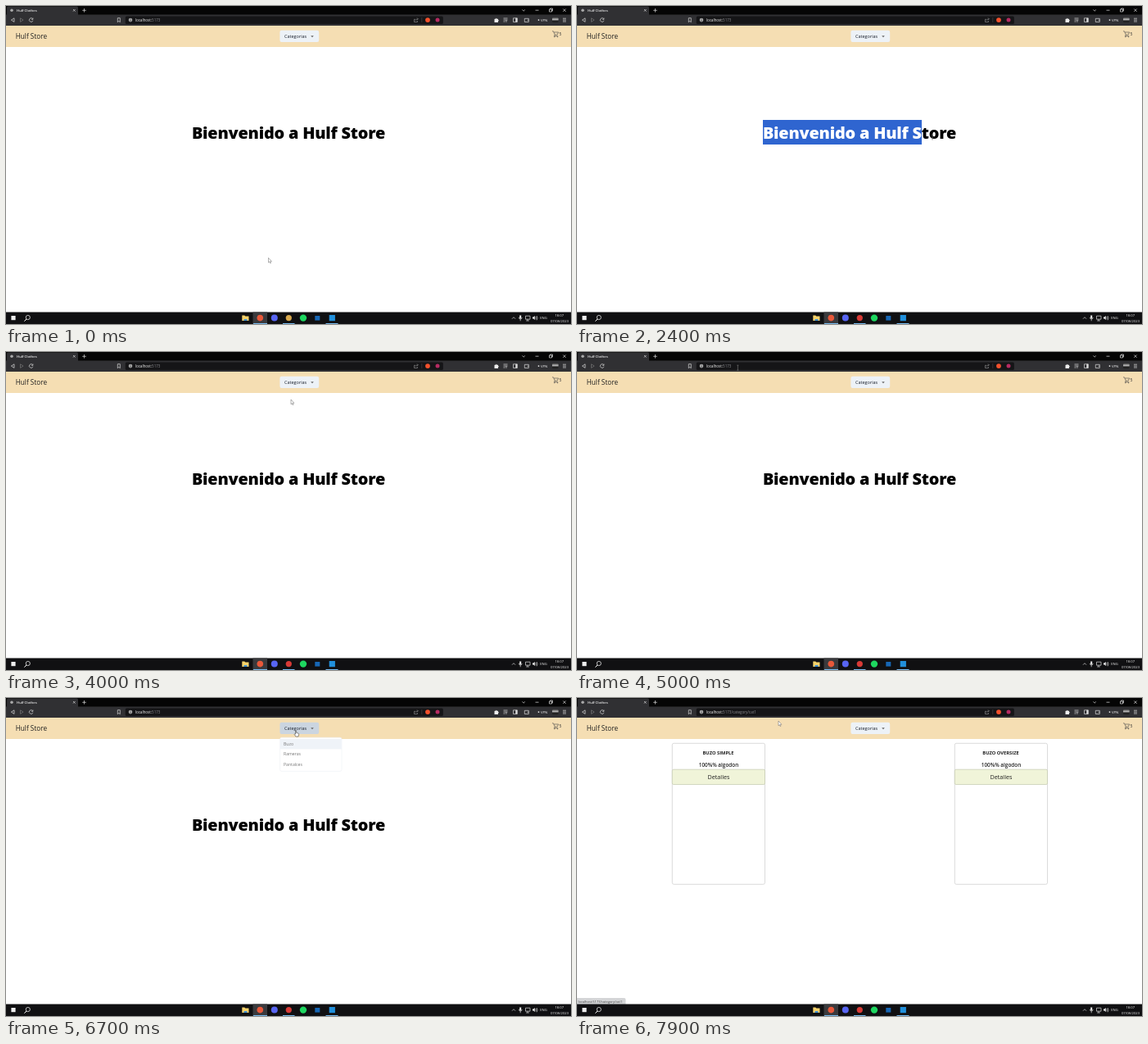
An HTML page for the animation above (8000 ms loop, 690 by 388 pixels).

```html
<!DOCTYPE html>
<html lang="es">
<head>
<meta charset="utf-8">
<title>Hulf Clothes</title>
<style>
  html, body { margin: 0; width: 100%; height: 100%; overflow: hidden; background: #fff; }
  svg { display: block; width: 690px; height: 388px; }
  text { font-family: "Open Sans", "Noto Sans", sans-serif; white-space: pre; }
  .line { fill: none; stroke: #ddd; stroke-width: .7; }
  .mid { text-anchor: middle; }
  .title { font-size: 19.9px; font-weight: 800; letter-spacing: -.2px; }
  .small { font-size: 4.2px; fill: #eee; }
  .url { font-size: 4.55px; }
  .item { font-size: 5.15px; fill: #777; }
</style>
</head>
<body>
<svg viewBox="0 0 690 388">
  <defs>
    <clipPath id="selectedClip"><rect id="clipBox" x="227" y="139" height="30" width="0"/></clipPath>
    <linearGradient id="avatar" x2="0" y2="1">
      <stop stop-color="#333"/><stop offset=".4" stop-color="#bbb"/><stop offset=".7" stop-color="#222"/>
    </linearGradient>
    <g id="card">
      <rect x=".3" y="55.3" width="113.2" height="172" rx="2" fill="#fff" stroke="#ccc" stroke-width=".7"/>
      <text class="mid" x="57" y="84.3" font-size="6.4" font-weight="600" fill="#222">100%% algodon</text>
      <rect x=".3" y="87.2" width="113.2" height="18.3" rx="1.6" fill="#f0f4d9" stroke="#c3c9ae" stroke-width=".7"/>
      <text class="mid" x="57" y="99" font-size="7.2" fill="#222">Detalles</text>
    </g>
  </defs>

  <rect width="690" height="388" fill="#fff"/>

  <g id="home">
    <text class="title mid" x="345" y="162">Bienvenido a Hulf Store</text>
    <g clip-path="url(#selectedClip)">
      <rect x="227" y="139" width="240" height="30" fill="#2f65d0"/>
      <text class="title mid" x="345" y="162" fill="#fff">Bienvenido a Hulf Store</text>
    </g>
  </g>

  <g id="category">
    <use href="#card" x="116"/>
    <use href="#card" x="461"/>
    <g class="mid" font-size="5.75" font-weight="700" fill="#222">
      <text x="172.5" y="69.3">BUZO SIMPLE</text>
      <text x="517.5" y="69.3">BUZO OVERSIZE</text>
    </g>
    <path d="M0 366H57.5q2 0 2 2V374H0Z" fill="#d4d5d7"/>
    <text x="1.5" y="371.7" font-size="4" fill="#444">localhost:5173/category/cat1</text>
  </g>

  <!-- store header -->
  <rect y="24" width="690" height="26" fill="#f5deb3"/>
  <text x="11.7" y="40" font-size="8.25" fill="#222">Hulf Store</text>
  <rect id="button" x="334.4" y="29.8" width="47.8" height="14.2" rx="2.2"/>
  <text x="340" y="39" font-size="5.5" font-weight="500" fill="#1a202c">Categorias</text>
  <path d="M372.2 36.3h3.6l-1.8 1.9z" fill="#666"/>
  <g class="line" style="stroke:#444;stroke-width:.6">
    <path d="M667 30.8h1.4l1.9 4.2h2.9l1.5-3h-5.600M670.3 35l-.9 1.600h4.800"/>
    <circle cx="669.9" cy="37.7" r=".4"/><circle cx="673.5" cy="37.7" r=".4"/>
  </g>
  <text x="675.6" y="36.4" font-size="5" fill="#333">5</text>

  <g id="menu">
    <rect x="334.6" y="48.2" width="75.4" height="41.2" rx="2" fill="#fff" stroke="#e8edf2" stroke-width=".5"/>
    <rect x="334.8" y="50" width="75" height="12.4" fill="#eff3f8"/>
    <text class="item" x="339" y="58.2">Buzo</text>
    <text class="item" x="339" y="70.4">Rameras</text>
    <text class="item" x="339" y="82.5">Pantalces</text>
  </g>

  <!-- browser window -->
  <rect width="690" height="24" fill="#050505"/>
  <path d="M1 10.5V2q0-1.5 1.5-1.5H86.5q1.5 0 1.5 1.5V10.5H690V24H0V10.5Z" fill="#303033"/>
  <circle cx="7" cy="5.3" r="1.8" fill="#aaa"/>
  <text class="small" x="13" y="6.9" font-weight="600">Hulf Clothes</text>
  <path class="line" d="M82 4l2.6 2.6m0-2.6L82 6.6M95.5 3v4.6M93.2 5.3h4.6"/>
  <path class="line" d="M630.5 4.5l1.7 1.6 1.7-1.6M646.5 5.2h4M663.5 4h3v3h-3zM664.5 4V3h3v3h-1M680.3 3.5l3.4 3.4m0-3.4l-3.4 3.4"/>
  <path class="line" d="M10 14.8l-3.6 2.3 3.6 2.3z"/>
  <path class="line" style="stroke:#777" d="M17.5 14.8l3.6 2.3-3.6 2.3z"/>
  <path class="line" d="M32.5 15.6a2.3 2.3 0 1 0 .4 2.2M32.9 14.5v1.8h-1.8M136.3 14.7h3v5l-1.5-1.3-1.5 1.3z"/>
  <rect id="address" x="145.8" y="12.4" width="388" height="9.6" rx="1.5" fill="#151517" stroke-width=".8"/>
  <circle cx="152" cy="17.1" r="2.3" fill="#aaa"/>
  <path d="M152 15.6v.7m0 .5v1.9" stroke="#222" stroke-width=".6"/>
  <rect id="urlSelection" x="157.3" y="13.7" width="32.7" height="7" fill="#2f74d0"/>
  <text class="url" x="157.8" y="18.8" fill="#f3f3f3">localhost:<tspan id="urlRest"></tspan></text>
  <path class="line" style="stroke:#888" d="M500 16.3h-1.5v3.2h4v-1.5M500.2 17.8q.3-2 3-2m-1.2-1.3l1.3 1.3-1.3 1.3"/>
  <path class="line" style="stroke:#555;stroke-width:.5" d="M507.8 14v6"/>
  <circle cx="515" cy="17.1" r="2.9" fill="#f4512c"/>
  <circle cx="527" cy="17.1" r="2.5" fill="#b62b62"/>
  <path d="M596.5 15.7h1.6q.5-2 1.4 0h1.5v1.4q1.8.5 0 1.5v1.4h-4.500z" fill="#eee"/>
  <path class="line" d="M607.5 15h5m-5 2h5m-5 2h2M611 17v2.8M619.5 14.8h4.8v4.7h-4.8zM633.3 15.3h5v4.2h-5zM636.5 17.3h2"/>
  <path d="M622.3 14.8h2v4.7h-2z" fill="#ddd"/>
  <circle cx="650.5" cy="17.1" r=".9" fill="#eee"/>
  <text class="small" x="653" y="18.6">VPN</text>
  <rect x="667" y="13.8" width="7.6" height="6.4" rx="1.5" fill="url(#avatar)"/>
  <path class="line" d="M680 15.2h4m-4 1.9h4m-4 1.9h4"/>

  <!-- taskbar -->
  <rect y="373.5" width="690" height="14.5" fill="#101012"/>
  <rect x="6.4" y="378" width="5.2" height="5.2" fill="#eee"/>
  <circle class="line" style="stroke:#fff" cx="26.8" cy="380" r="2.6"/>
  <path class="line" style="stroke:#fff;stroke-width:1" d="M25 382l-2.6 2.6"/>
  <rect x="301.5" y="373.5" width="17.5" height="14.5" fill="#3a3a3d"/>
  <path d="M288.3 377.5h3l1 1h4.200v5.500h-8.200z" fill="#f6d26b"/>
  <path d="M290.500 382h4v2h-4z" fill="#3f91d5"/>
  <circle cx="310.3" cy="380.6" r="3.8" fill="#e8583a"/>
  <circle cx="327.8" cy="380.6" r="4" fill="#5865f2"/>
  <circle id="appIcon" cx="345.3" cy="380.6" r="3.6"/>
  <circle cx="363" cy="380.6" r="4.2" fill="#1ed760"/>
  <rect x="377.3" y="378" width="6" height="5.6" fill="#1767b5"/>
  <rect x="394.7" y="377" width="7.2" height="7.2" fill="#2190dc"/>
  <path d="M302 387.5h17M338 387.5h14.5M390.5 387.5h15" stroke="#76b9ed"/>
  <path class="line" d="M618 381.7l2-2 2 2M626.4 380v1q1.8 2.5 3.6 0v-1M628.2 382.3v2M634.5 378.2h5.5v4h-5.5zM637 382.3v1.8M635.2 384h3.6M646.8 379q1 1.7 0 3.4m1.3-4.3q1.8 2.6 0 5.2"/>
  <path d="M627.2 377.5h2v4h-2zM643 379.6h1.2l1.6-1.5v5l-1.6-1.5H643z" fill="#eee"/>
  <text class="small mid" x="656.5" y="382.2">ENG</text>
  <text class="small mid" x="675.8" y="379.4">18:07</text>
  <text class="small mid" x="676" y="385.7">07/08/2023</text>

  <g id="pointer">
    <path id="arrow" d="M0 0V5.8L1.3 4.6 2.2 6.6 3 6.2 2.2 4.3H3.9Z" fill="#fff" stroke="#555" stroke-width=".45"/>
    <path id="beam" d="M-1-3h2M0-3v6M-1 3h2" stroke="#888" stroke-width=".55"/>
    <path id="hand" d="M-.5 0q.6-.6 1.1 0V2.5l2.5.6q.7.3.5 1.2L3 7H-.1L-1.9 4.3q.2-1 1.4-.1Z" fill="#fff" stroke="#222" stroke-width=".5"/>
  </g>
</svg>
<script>
  const DURATION = 8000, STEP = 100;
  const $ = id => document.getElementById(id);
  const show = (id, visible) => $(id).style.display = visible ? "" : "none";

  // [ms, x, y]
  const route = [
    [1000, 320.5, 307.3], [1200, 290, 262], [1400, 216, 168], [1700, 223.5, 156.5], [1900, 227, 156],
    [2000, 229, 157], [2400, 434, 160], [2600, 466, 160], [2800, 469, 159], [3200, 480, 158],
    [3300, 487, 157], [3500, 404, 118], [3650, 335, 98], [3800, 291, 76], [4000, 348, 58], [4200, 371, 36],
    [4300, 369, 36], [4600, 290, 28], [5100, 173, 17], [5400, 173, 17],
    [5600, 138, 69], [5800, 129, 84], [6000, 180, 77], [6300, 352, 42], [6500, 354, 40],
    [6900, 354, 40], [7200, 347, 55], [7300, 347, 55], [7600, 296, 40], [7900, 246, 28]
  ];
  const selection = [[1900, 0], [2000, 3], [2400, 194], [2600, 236]];

  function sample(keys, t) {
    const next = keys.findIndex(key => key[0] > t);
    if (next === 0) return keys[0].slice(1);
    if (next < 0) return keys[keys.length - 1].slice(1);
    const a = keys[next - 1], b = keys[next];
    const p = (t - a[0]) / (b[0] - a[0]);
    return a.slice(1).map((v, i) => v + (b[i + 1] - v) * p);
  }

  const during = (t, from, to) => t >= from && t < to;

  function render(t) {
    const [x, y] = sample(route, t);
    $("pointer").setAttribute("transform", `translate(${x} ${y})`);
    const overButton = during(t, 4100, 4400) || during(t, 6300, 7400);
    const overText = during(t, 1900, 3300) || during(t, 4900, 5500);
    show("hand", overButton);
    show("beam", overText);
    show("arrow", !overButton && !overText);

    const onCategory = t >= 7300;
    show("home", !onCategory);
    show("category", onCategory);
    $("clipBox").setAttribute("width", t < 2800 ? sample(selection, t)[0] : 0);

    const menuOpen = during(t, 6500, 7300);
    const opening = Math.min(1, (t - 6400) / 200);
    const scale = .8 + .2 * opening;
    show("menu", menuOpen);
    $("menu").setAttribute("opacity", Math.max(0, opening));
    $("menu").setAttribute("transform", `translate(334.6 48.2) scale(${scale}) translate(-334.6 -48.2)`);
    $("button").setAttribute("fill", menuOpen ? "#cbd5e0" : overButton && !onCategory ? "#e2e8f0" : "#edf2f7");

    const focused = during(t, 5200, 6200);
    show("urlSelection", focused);
    $("address").setAttribute("stroke", focused ? "#a8442c" : "none");
    $("urlRest").textContent = onCategory ? "5173/category/cat1" : "5173";
    $("urlRest").setAttribute("fill", focused ? "#f3f3f3" : "#8b8b8e");
    $("appIcon").setAttribute("fill", t < 100 ? "#d9a94e" : "#d83a36");
  }

  const start = performance.now();
  function tick() {
    const t = (performance.now() - start) % DURATION;
    render(Math.floor(t / STEP) * STEP);
    requestAnimationFrame(tick);
  }
  tick();
</script>
</body>
</html>
```
